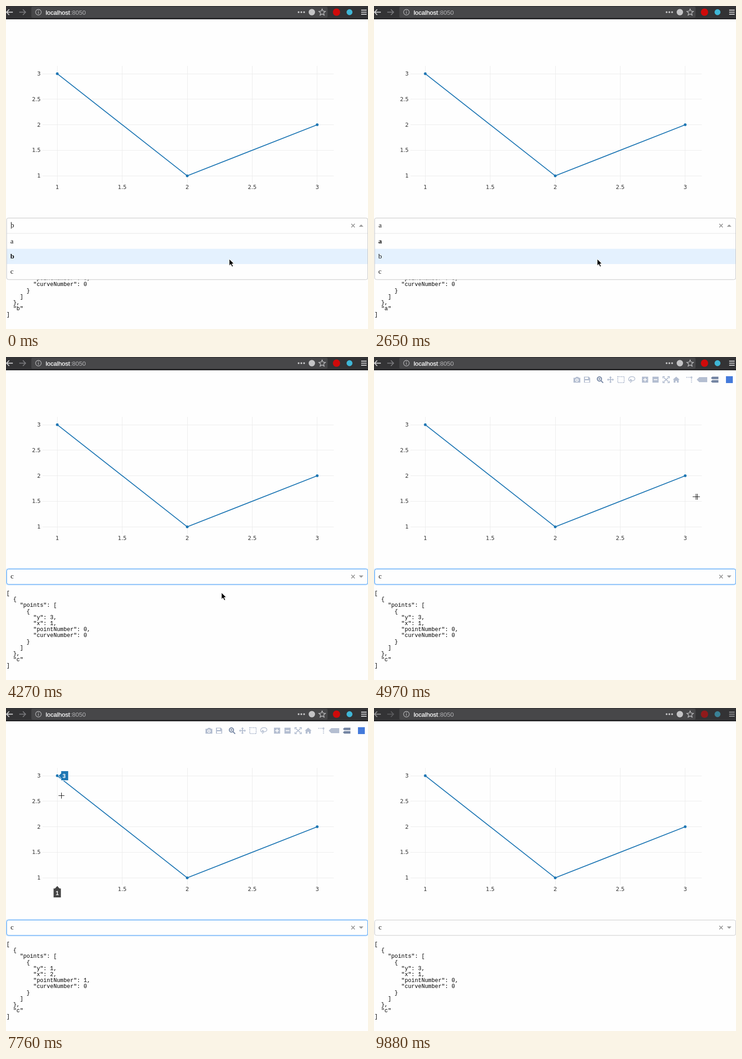
Write an HTML page that moves like this. It is 793x706 px and loops after 9980 ms.

```html
<!DOCTYPE html>
<html lang="en">
<head>
<meta charset="utf-8">
<title>Chart and dropdown</title>
<style>
  html, body { margin: 0; width: 100%; height: 100%; overflow: hidden; background: #fefefe; }
  svg { display: block; width: 793px; height: 706px; }
  .url { font: 13.5px "Liberation Sans", Arial, sans-serif; }
  .axis { font: 12px "DejaVu Sans", Verdana, sans-serif; fill: #333; }
  .serif { font: 15.5px "Liberation Serif", Times, serif; fill: #111; }
  .mono { font: 12.25px "Courier New", "Liberation Mono", monospace; fill: #000; white-space: pre; }
  .tip { font: bold 12.5px "Liberation Sans", Arial, sans-serif; fill: #fff; text-anchor: middle; }
</style>
</head>
<body>
<svg viewBox="0 0 793 706">
  <rect width="793" height="706" fill="#fefefe"/>

  <g id="browser">
    <rect width="793" height="28" fill="#333335"/>
    <rect y="27.5" width="793" height="1.5" fill="#111113"/>
    <rect x="55.5" y="1.5" width="649" height="24" rx="3" fill="#474749" stroke="#3d3d3f"/>
    <g class="dims" fill="none" stroke="#d2d2d4" stroke-width="1.8">
      <path d="M15 13.5H1M7 7.5L1 13.5L7 19.5"/>
      <path d="M29 13.5H43M37 7.5L43 13.5L37 19.5" stroke="#77777a"/>
      <path d="M778 9H790M778 13.5H790M778 18H790"/>
    </g>
    <g fill="none" stroke="#bdbdbf" stroke-width="1.2">
      <circle cx="71" cy="13.5" r="6.2"/>
      <path d="M71 12.3V17M71 9.4V11"/>
      <path d="M692.5 6.5l2.1 4.7 5.1.5-3.9 3.4 1.2 5-4.5-2.7-4.5 2.7 1.2-5-3.9-3.4 5.1-.5z" stroke-width="1.4"/>
    </g>
    <g fill="#c4c4c6">
      <circle cx="641" cy="13.5" r="2"/><circle cx="647" cy="13.5" r="2"/><circle cx="653" cy="13.5" r="2"/>
      <circle cx="670" cy="13.5" r="7"/>
    </g>
    <text class="url" x="87" y="18.5" fill="#fafafa" stroke="#fafafa" stroke-width=".35">localhost</text>
    <text class="url" x="141" y="18.5" fill="#b1b1b3">:8050</text>
    <g class="dims">
      <circle cx="724" cy="13.5" r="8" fill="#cf0a0a"/>
      <circle cx="752.5" cy="13.5" r="6.5" fill="#3fb6d6"/>
    </g>
  </g>

  <g id="chart"></g>

  <g id="modebar" fill="#b4bed1" stroke="none">
    <path fill-rule="evenodd" d="M437 45.5h4l1.5-2h5l1.5 2h3v10.500h-15zM444.500 47a3.500 3.500 0 1 0 .01 0zM444.500 48.800a1.700 1.700 0 1 1-.01 0z"/>
    <path fill-rule="evenodd" d="M460 43h10.500l3 3v10h-13.500zM462 44.500v3.500h7v-3.500zM462 51v4h9.500v-4z"/>
    <g fill="none" stroke="#7485a3" stroke-width="2.2">
      <circle cx="493.800" cy="48" r="4.600"/><path d="M497 51.500L502 56.500"/><path d="M491.500 48h4.600M493.800 45.700v4.600" stroke-width="1.3"/>
    </g>
    <path d="M518 42l3 3.500h-2v3h3.500v-2l3 3-3 3v-2H519v3.500h2l-3 3-3-3h2v-3.500h-3.500v2l-3-3 3-3v2h3.500v-3h-2z"/>
    <rect x="534" y="43" width="14" height="13" fill="none" stroke="#b4bed1" stroke-width="2" stroke-dasharray="2 1.500"/>
    <path d="M562 53c-7-1-5-10 3-10s9 8 1 9c-4 .5-6-2-4-3s4 5-1 7" fill="none" stroke="#b4bed1" stroke-width="1.500"/>
    <path fill-rule="evenodd" d="M587 43h13.500v13h-13.500zM592.800 45.500v3h-3v2h3v3h2v-3h3v-2h-3v-3z"/>
    <path fill-rule="evenodd" d="M610 43h13.500v13h-13.500zM612.800 48.500v2h8v-2z"/>
    <path d="M633 46.500V43H637M643 43h4v3.500M647 52.500V56h-4M637 56h-4v-3.500M635 45l10 9M645 45l-10 9" fill="none" stroke="#b4bed1" stroke-width="1.800"/>
    <path d="M662 43l7.500 6.500h-2V56h-4v-4h-3v4h-4v-6.500h-2z"/>
    <path d="M684 44.500H694M695.500 47V56" fill="none" stroke="#b4bed1" stroke-width="2" stroke-dasharray="2 1.500"/>
    <circle cx="695.500" cy="44.500" r="2"/>
    <path d="M707 49.500l5.500-5.500H730v11H712.500z"/>
    <path d="M738 46l3-3h13.500v5.500H741zM738 53.500l3-3h13.500V56H741z" fill="#7485a3"/>
    <rect x="771" y="42" width="15" height="15" fill="#447adb"/>
  </g>

  <g id="hover">
    <g id="valueTip">
      <path d="M2.500 0L8 -5V-10.500H24.500V10.500H8V5Z" fill="#1f77b4" stroke="#fff"/>
      <text id="valueText" class="tip" x="15" y="4.800"></text>
    </g>
    <g id="axisTip">
      <path d="M0 388.500L5 394H8.500V414.500H-8.500V394H-5Z" fill="#444" stroke="#fff"/>
      <text id="axisText" class="tip" x="0" y="408.800"></text>
    </g>
  </g>

  <g id="json"></g>

  <g id="dropdown">
    <rect id="glow" x="1" y="463" width="791.500" height="34.500" rx="4" fill="none" stroke="#007eff" stroke-opacity=".12" stroke-width="4"/>
    <rect id="field" x="1.500" y="463.500" width="791" height="33.500" rx="4" fill="#fefefe"/>
    <g id="menu">
      <path d="M1.500 497V467.500a4 4 0 0 1 4-4H788.500a4 4 0 0 1 4 4V594a4 4 0 0 1-4 4H5.500a4 4 0 0 1-4-4Z" fill="#fefefe" stroke="#c2c2c2"/>
      <path d="M2 497H792" stroke="#e2e2e2"/>
      <rect id="highlight" x="2" width="790" height="33.300" fill="#e4f1fe"/>
    </g>
    <text id="value" class="serif" x="10" y="484"></text>
    <path id="caret" d="M11.500 472V487" stroke="#222"/>
    <path d="M756.500 476.200L764 483.800M764 476.200L756.500 483.800" stroke="#999" stroke-width="1.800"/>
    <path id="arrow" fill="#999"/>
  </g>

  <path id="pointer" d="M0 0V14.500L3.400 11.400L6 17L8.500 15.900L6 10.500H10.500Z" fill="#000" stroke="#fff" stroke-width="1"/>
  <g id="cross" fill="none" stroke="#111" stroke-width="1.100">
    <path d="M-6 .500H7M.500 -6V7"/>
    <path id="ghost" d="M-7 .500H9M3.500 -6V7"/>
  </g>
</svg>
<script>
const LOOP = 9980;
const byId = id => document.getElementById(id);
const show = (id, on) => { byId(id).style.display = on ? '' : 'none'; };
const move = (id, x, y) => byId(id).setAttribute('transform', `translate(${x} ${y})`);

function add(parent, tag, attrs, text = '') {
  const el = document.createElementNS('http://www.w3.org/2000/svg', tag);
  for (const key in attrs) el.setAttribute(key, attrs[key]);
  el.textContent = text;
  byId(parent).appendChild(el);
  return el;
}

// Chart
const points = [[1, 3], [2, 1], [3, 2]];
const px = x => 112.3 + (x - 1) * 284.7;
const py = y => 371.2 - (y - 1) * 111.6;
const tickLabels = {};
for (let v = 1; v <= 3; v += 0.5) {
  const gx = Math.floor(px(v)) + 0.5, gy = Math.floor(py(v)) + 0.5;
  add('chart', 'path', { d: `M${gx} 131V387M80 ${gy}H718`, stroke: '#ebebeb' });
  tickLabels[v] = add('chart', 'text', { class: 'axis', x: px(v), y: 400, 'text-anchor': 'middle' }, v);
  add('chart', 'text', { class: 'axis', x: 76, y: py(v) + 4, 'text-anchor': 'end' }, v);
}
add('chart', 'polyline', {
  points: points.map(([x, y]) => [px(x), py(y)]).join(' '),
  fill: 'none', stroke: '#1f77b4', 'stroke-width': 2
});
for (const [x, y] of points) add('chart', 'circle', { cx: px(x), cy: py(y), r: 3, fill: '#1f77b4' });

// Output and menu
const jsonLines = Array.from({ length: 13 }, (_, i) => add('json', 'text', { class: 'mono', y: 520 + i * 13.2 }));
const options = ['a', 'b', 'c'].map((name, i) =>
  add('menu', 'text', { class: 'serif', x: 9.5, y: 518.7 + i * 33.2 }, name));

function drawJson(index, choice) {
  const [x, y] = points[index];
  const text = JSON.stringify(
    [{ points: [{ y, x, pointNumber: index, curveNumber: 0 }] }, choice], null, 2);
  text.split('\n').forEach((line, i) => {
    const body = line.trimStart();
    jsonLines[i].setAttribute('x', 1 + (line.length - body.length) * 7.35);
    jsonLines[i].textContent = body;
  });
}

// Each move holds its pose between evenly spaced steps.
const moves = [
  { from: 0, to: 0, path: [[489, 553]] },
  { from: 4270, to: 5200, path: [[472, 515], [430, 445], [391, 385], [430, 368], [530, 345], [640, 320], [705, 305], [697, 280], [686, 265]] },
  { from: 5910, to: 6720, path: [[668, 273], [600, 300], [500, 330], [410, 352], [365, 352], [352, 355], [372, 361], [389, 366]] },
  { from: 7190, to: 7760, path: [[350, 345], [260, 290], [165, 222], [108, 188], [115, 190], [121, 191]] },
  { from: 8240, to: 8830, path: [[121, 191], [150, 260], [200, 370], [260, 520], [330, 657], [400, 760]] }
];

function cursorAt(t) {
  const { from, to, path } = moves.filter(m => t >= m.from).pop();
  const last = path.length - 1;
  const step = last ? Math.floor((t - from) / (to - from) * last) : 0;
  return path[Math.min(last, step)];
}

// The latest entry whose start time has passed.
const at = (t, entries) => entries.filter(([start]) => t >= start).pop()[1];

function drawDropdown(t, choice) {
  const open = t < 720 || (t >= 2650 && t < 3200);
  const focused = !open && t < 9880;
  show('menu', open);
  show('glow', focused);
  show('caret', t < 120);
  byId('field').setAttribute('stroke', focused ? '#2b8ff5' : '#c6c6c6');
  byId('value').textContent = choice;
  byId('arrow').setAttribute('d', open ? 'M773 482.500H783L778 477.500Z' : 'M773 477.500H783L778 482.500Z');
  const row = at(t, [[0, 1], [360, 0], [2650, 1], [3080, 2]]);
  byId('highlight').setAttribute('y', 497.5 + row * 33.2);
  options.forEach(el => { el.style.fontWeight = el.textContent === choice ? 'bold' : 'normal'; });
}

function drawPointer(t) {
  const [x, y] = cursorAt(t);
  const inPlot = x > 80 && x < 718 && y > 131 && y < 387;
  const inChart = y > 29 && y < 461;
  show('modebar', inChart);
  show('pointer', !inPlot && y < 706);
  show('cross', inPlot);
  show('ghost', t >= 4970 && t < 5080);
  move('pointer', x, y);
  move('cross', x, y);

  const near = inPlot ? points.find(p => Math.abs(px(p[0]) - x) < 20) : null;
  show('hover', near);
  for (const [vx] of points) tickLabels[vx].style.display = near && near[0] === vx ? 'none' : '';
  if (!near) return;
  move('valueTip', px(near[0]), py(near[1]));
  move('axisTip', px(near[0]), 0);
  byId('axisText').textContent = near[0];
  byId('valueText').textContent = near[1];
}

function render(t) {
  const choice = at(t, [[0, 'b'], [720, 'a'], [3200, 'c']]);
  drawJson(at(t, [[0, 0], [5550, 2], [6960, 1], [8240, 0]]), choice);
  drawDropdown(t, choice);
  drawPointer(t);
  document.querySelectorAll('.dims').forEach(el => { el.style.opacity = t >= 9880 ? 0.6 : 1; });
}

const start = performance.now();
function tick() {
  render((performance.now() - start) % LOOP);
  requestAnimationFrame(tick);
}
tick();
</script>
</body>
</html>
```
